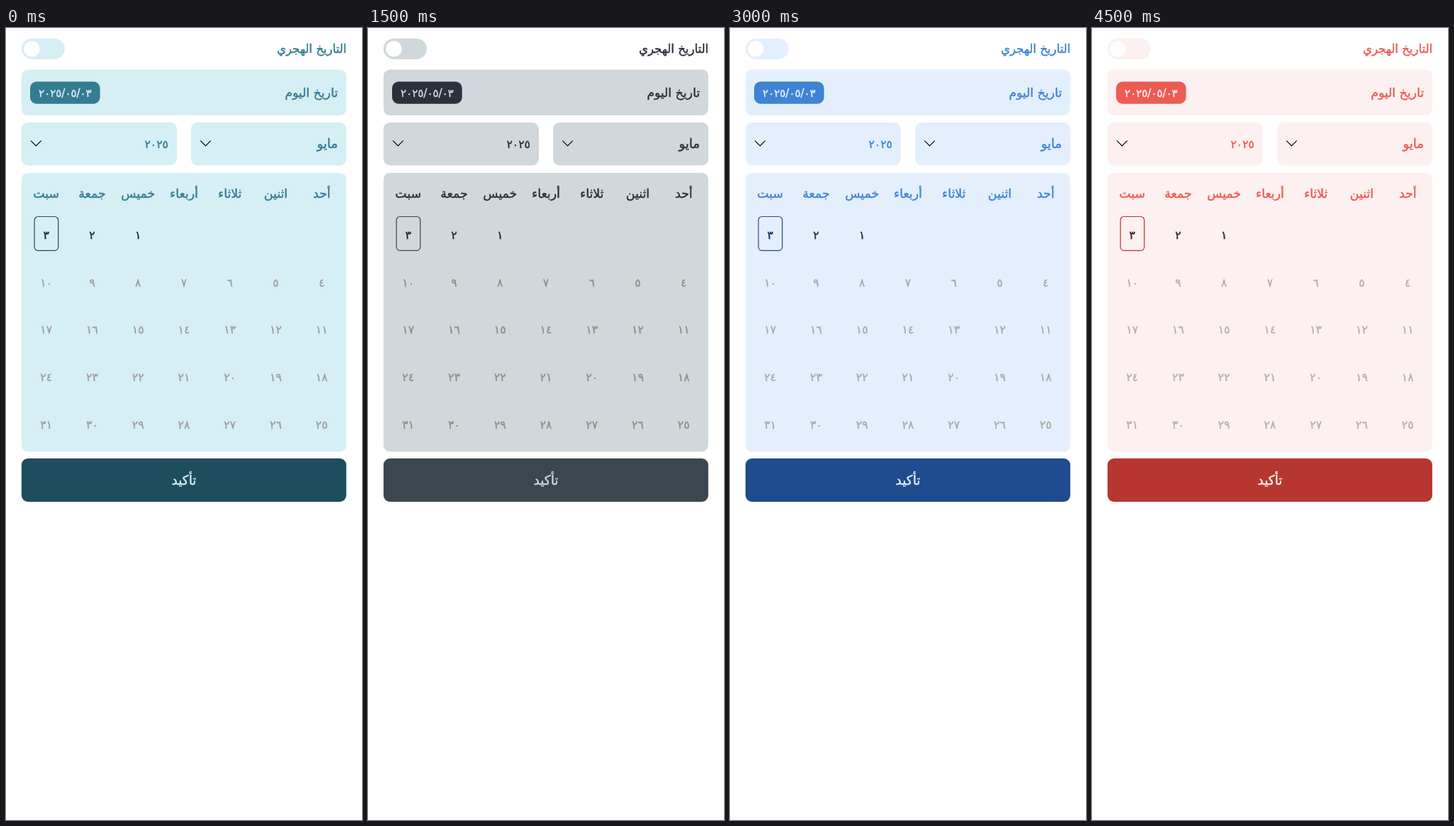
Recreate the animation shown at these times as an HTML page with a canvas. Size 502 px wide and 1115 px high, loop 5 s.

```html
<!DOCTYPE html>
<html lang="ar">
<head>
<meta charset="utf-8">
<title>التاريخ</title>
<style>
  html, body { margin: 0; width: 100%; height: 100%; overflow: hidden; background: #fff; }
  canvas { display: block; width: 502px; height: 1115px; }
</style>
</head>
<body>
<canvas id="stage"></canvas>
<script>
const WIDTH = 502, HEIGHT = 1115, STEP = 500;
const LEFT = 21.85, FULL = 458;
const canvas = document.getElementById('stage');
const ratio = window.devicePixelRatio || 1;
canvas.width = WIDTH * ratio;
canvas.height = HEIGHT * ratio;
const ctx = canvas.getContext('2d');
ctx.scale(ratio, ratio);

const theme = (light, main, dark, day, muted) => ({ light, main, dark, day, muted });
const THEMES = [
  theme('#d6eff4', '#357c92', '#1e4d5e', '#12303c', '#9e9e9e'),
  theme('#f0e8fe', '#9163e0', '#502191', '#43177d', '#bdbdbd'),
  theme('#fae5ba', '#f07830', '#d65a26', '#3a1f17', '#a8a8a8'),
  theme('#d0d8db', '#2a313a', '#3b474f', '#22282e', '#8e8e8e'),
  theme('#dcf0df', '#4ca66b', '#2e6b45', '#1c3f2a', '#a6a6a6'),
  theme('#f7e4ea', '#9f2757', '#7b1e4c', '#5a1035', '#bdbdbd'),
  theme('#e3effc', '#3f83d6', '#1e4c8f', '#14315c', '#a8a8a8'),
  theme('#fff7e3', '#f4c150', '#e68638', '#4a3428', '#9e9e9e'),
  theme('#fdeff4', '#e85d92', '#b53469', '#4a1a2e', '#b0b0b0'),
  theme('#fdf0f0', '#ee5b55', '#b73630', '#3a2222', '#b0b0b0')
];
const WEEKDAYS = ['أحد', 'اثنين', 'ثلاثاء', 'أربعاء', 'خميس', 'جمعة', 'سبت'];
const FIRST_COLUMN = 4, TODAY = 3;

const arabic = value =>
  String(value).replace(/\d/g, d => String.fromCharCode(0x660 + Number(d)));
const columnX = column => 445.2 - 64.75 * column;

function box(x, y, w, h, radius, color) {
  ctx.beginPath();
  ctx.roundRect(x, y, w, h, radius);
  ctx.fillStyle = color;
  ctx.fill();
}

function text(value, x, baseline, size, color, align = 'center') {
  ctx.font = `${size}px "DejaVu Sans", sans-serif`;
  ctx.direction = 'rtl';
  ctx.textAlign = align;
  ctx.fillStyle = ctx.strokeStyle = color;
  ctx.lineWidth = 0.45;
  ctx.fillText(value, x, baseline);
  ctx.strokeText(value, x, baseline);
}

function select(x, label, size, colors) {
  box(x, 133, 219, 60.5, 9, colors.light);
  text(label, x + 207, 169.2, size, colors.main, 'right');
  ctx.beginPath();
  ctx.moveTo(x + 13.2, 158.6);
  ctx.lineTo(x + 20.5, 165.9);
  ctx.lineTo(x + 27.8, 158.6);
  ctx.strokeStyle = '#000';
  ctx.lineWidth = 1.2;
  ctx.stroke();
}

function calendar({ light, main, dark, day: active, muted }) {
  box(LEFT, 203.9, FULL, 392.5, 9, light);
  WEEKDAYS.forEach((name, i) => text(name, columnX(i), 238.8, 17.3, main));
  for (let day = 1; day <= 31; day++) {
    const cell = day - 1 + FIRST_COLUMN;
    const row = Math.floor(cell / 7);
    text(arabic(day), columnX(cell % 7), 296.7 + 66.8 * row, 15.5,
      day <= TODAY ? active : muted);
  }
  ctx.beginPath();
  ctx.roundRect(40.1, 265.5, 33.6, 47.8, 5);
  ctx.strokeStyle = dark;
  ctx.lineWidth = 1.2;
  ctx.stroke();
}

function draw(colors) {
  const { light, main, dark } = colors;
  ctx.fillStyle = '#fff';
  ctx.fillRect(0, 0, WIDTH, HEIGHT);

  box(LEFT, 14.7, 61, 29.2, 14.6, light);
  box(25.2, 18.2, 22.4, 22.4, 11.2, '#fff');
  text('التاريخ الهجري', 480, 35, 16.5, main, 'right');

  box(LEFT, 58.4, FULL, 64.7, 9, light);
  box(34, 75.5, 98.6, 31.2, 9, main);
  text('تاريخ اليوم', 468, 97.2, 17.3, main, 'right');
  text(arabic('2025/05/03'), 83.4, 97, 15, light);

  select(261, 'مايو', 18, colors);
  select(LEFT, arabic(2025), 15.5, colors);
  calendar(colors);

  box(LEFT, 606.1, FULL, 60.8, 9, dark);
  text('تأكيد', 251, 643, 18.5, light);
}

let start, shown = -1;
function frame(now) {
  start ??= now;
  const index = Math.floor((now - start) / STEP) % THEMES.length;
  if (index !== shown) draw(THEMES[shown = index]);
  requestAnimationFrame(frame);
}
requestAnimationFrame(frame);
</script>
</body>
</html>
```
